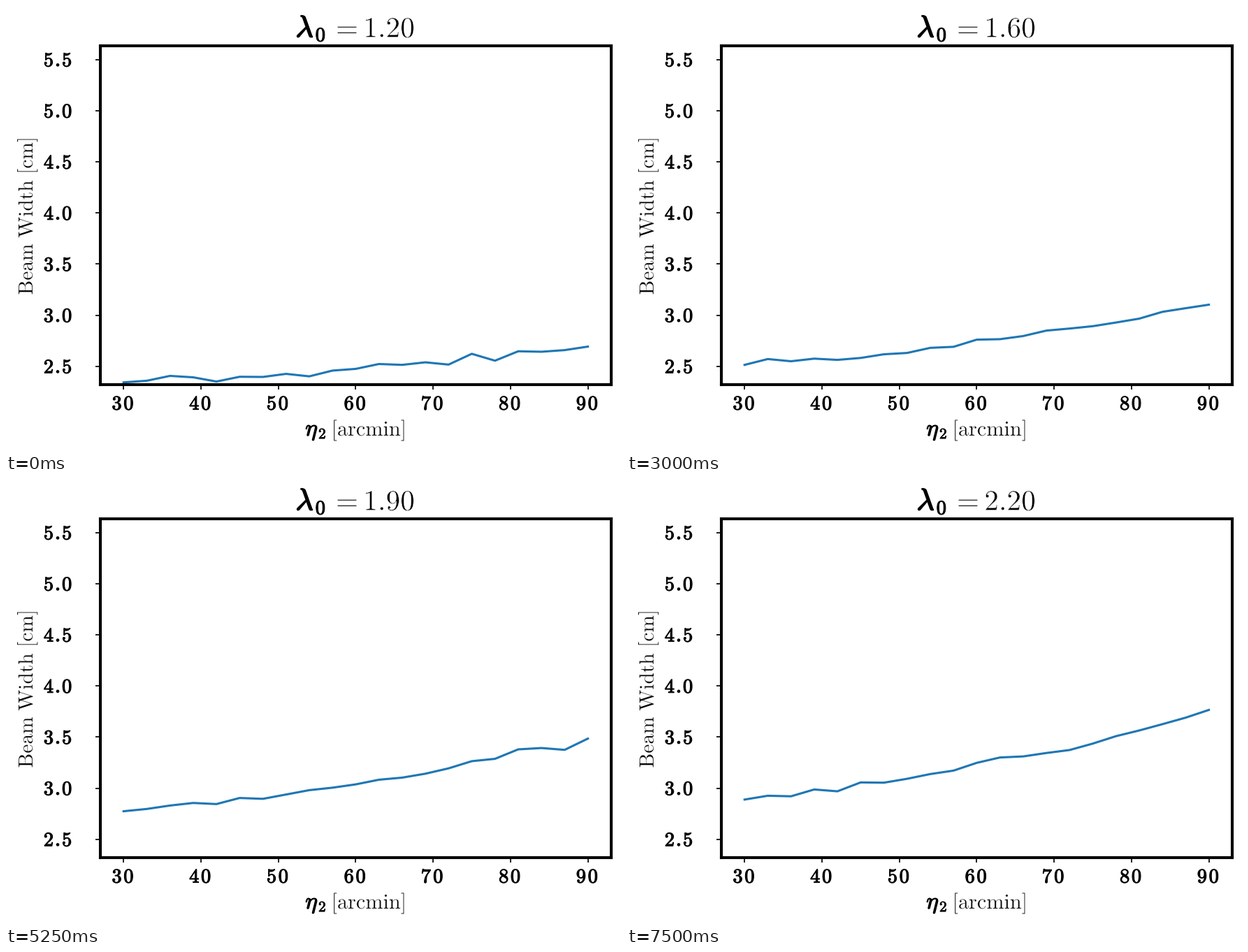
Animation, 880 px wide and 637 px high, one loop 8000 ms. Source, as a matplotlib script:

```python
import numpy as np
import matplotlib.pyplot as plt
from matplotlib.animation import FuncAnimation
from matplotlib.patches import PathPatch
from matplotlib.path import Path
from matplotlib.textpath import TextPath
from matplotlib.transforms import Affine2D

plt.rcParams["mathtext.fontset"] = "cm"

W, H, DPI = 880, 637, 100
PT = 72 / DPI  # points per pixel
INTERVAL, HOLD, LOOP = 250, 750, 8000

LEFT, RIGHT, TOP, BOTTOM = 135, 865.8, 57.3, 542.3
X_LIM = (27, 93)
Y_LIM = (2.319, 5.633)

STEPS = 11
ETA = np.arange(30, 91, 3)
NOISE = np.random.default_rng(4).normal(0, 0.022, (STEPS, len(ETA)))


def beam_width(step):
    """Width in cm over ETA: a sagging ramp that climbs and steepens, plus noise."""
    u = (ETA - 30) / 60
    start = 2.34 + 0.058 * step
    end = 2.69 + 0.11 * step
    sag = (0.25 + 0.02 * step) * u * (1 - u)
    ripple = 0.035 * np.cos(2 * np.pi * (step - 1) / 6)
    width = start + (end - start) * u - sag + ripple + NOISE[step]
    return np.maximum(width, Y_LIM[0])


fig = plt.figure(figsize=(W / 100, H / 100), dpi=DPI, facecolor="white")
pixels = Affine2D().scale(1 / DPI) + fig.dpi_scale_trans


def math_path(text, x, y, size, anchor=0.5, angle=0):
    """Glyph outlines with the ink anchored at x and the baseline at y."""
    path = TextPath((0, 0), f"${text}$", size=size)
    box = path.get_extents()
    shift = -(box.x0 + anchor * box.width)
    place = Affine2D().translate(shift, 0).rotate_deg(angle).translate(x, H - y)
    return path.transformed(place)


def add_path(path, weight=0.0):
    """Fill glyphs; a positive weight thickens the strokes, a negative one thins them."""
    edge = "black" if weight >= 0 else "white"
    patch = PathPatch(path, facecolor="black", edgecolor=edge,
                      linewidth=abs(weight) * PT, joinstyle="round", transform=pixels)
    return fig.add_artist(patch)


def bold_number(text, x, y, size):
    """Bold digits in fixed cells, centred on x."""
    advance = [(0.319 if c == "." else 0.575) * size for c in text]
    pen = x - sum(advance) / 2
    for c, step in zip(text, advance):
        mid = pen + step / 2
        if c == ".":
            r = 0.079 * size
            add_path(Path.circle((mid, H - y + r), r))
        else:
            add_path(math_path(rf"\mathbf{{{c}}}", mid, y - 0.3, 0.97 * size), 0.038 * size)
        pen += step


ax = fig.add_axes([LEFT / W, 1 - BOTTOM / H, (RIGHT - LEFT) / W, (BOTTOM - TOP) / H])
ax.set(xlim=X_LIM, ylim=Y_LIM, facecolor="white")
x_ticks = np.arange(30, 91, 10)
y_ticks = np.arange(2.5, 5.6, 0.5)
ax.set_xticks(x_ticks)
ax.set_yticks(y_ticks)
ax.tick_params(length=7.3 * PT, width=1.7 * PT, labelbottom=False, labelleft=False)
for spine in ax.spines.values():
    spine.set_linewidth(4.1 * PT)
line, = ax.plot(ETA, beam_width(0), color="#1f77b4", linewidth=3.1 * PT)

for v in x_ticks:
    px = LEFT + (v - X_LIM[0]) / (X_LIM[1] - X_LIM[0]) * (RIGHT - LEFT)
    bold_number(str(v), px - 1.3, 578, 29.3)
for v in y_ticks:
    py = BOTTOM - (v - Y_LIM[0]) / (Y_LIM[1] - Y_LIM[0]) * (BOTTOM - TOP)
    bold_number(f"{v:.1f}", 74, py + 9.9, 29.3)

# Axis labels
add_path(math_path(r"\mathrm{Beam\ Width\ [cm]}", 38, 301.5, 29.4, angle=90), -0.3)
add_path(math_path(r"\eta", 437, 615, 33), 1.3)
bold_number("2", 452.3, 619.5, 22)
add_path(math_path(r"\mathrm{[arcmin]}", 519.3, 615, 30.3), -0.3)

# Title
add_path(math_path(r"\lambda", 427.5, 44.2, 43.5), 1.8)
bold_number("0", 449.8, 50.7, 29.3)
add_path(math_path("=", 488, 44.7, 41.5), -0.5)


def number_path(step):
    return math_path(rf"\mathrm{{{1.2 + step / 10:.2f}}}", 583.2, 44.7, 41.4, anchor=1)


number = add_path(number_path(0), -0.5)


def update(i):
    step = i * INTERVAL // HOLD
    line.set_ydata(beam_width(step))
    number.set_path(number_path(step))
    return line, number


anim = FuncAnimation(fig, update, frames=LOOP // INTERVAL, interval=INTERVAL,
                     repeat=True, repeat_delay=0, blit=False)
plt.show()
```
